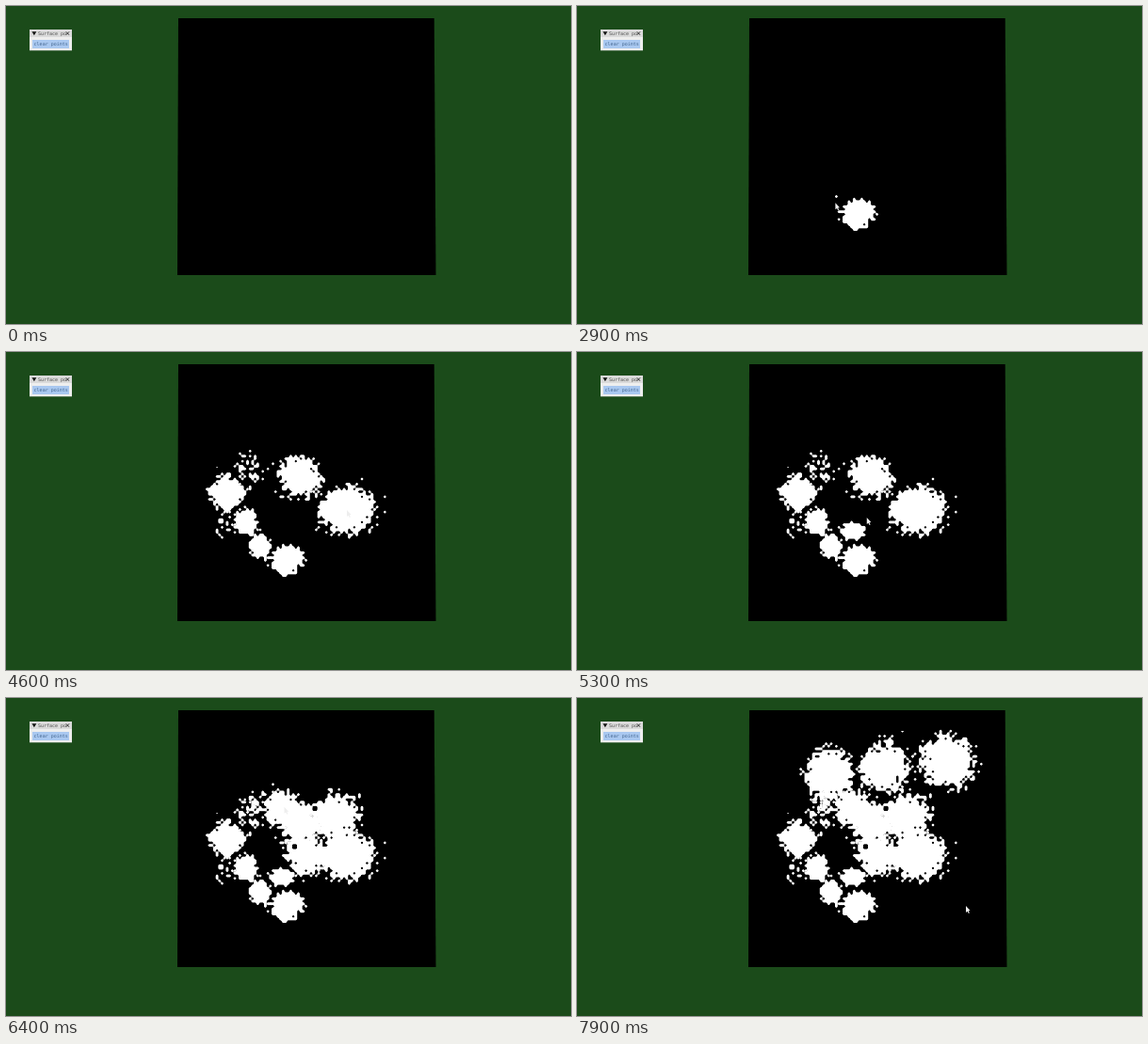
An HTML page with a canvas that plays this animation: 600x338 px, repeating every 8000 ms.

```html
<!DOCTYPE html>
<html lang="en">
<head>
<meta charset="utf-8">
<title>Surface points</title>
<style>
html, body { margin: 0; width: 100%; height: 100%; overflow: hidden; background: #1b4b1a; }
canvas { display: block; }
</style>
</head>
<body>
<canvas id="stage" width="600" height="338"></canvas>
<script>
const W = 600, H = 338, LOOP = 8000, STEP = 100;
const PITCH = 2.7, SCATTER = .1;
const ctx = document.getElementById('stage').getContext('2d');
const stops = [], sprays = [];

const mix = (a, b, k) => a + (b - a) * k;
const clamp = v => Math.max(0, Math.min(1, v));
const smooth = k => k * k * (3 - 2 * k);

function rand(i, j, seed) {
  let h = Math.imul(i, 374761393) + Math.imul(j, 668265263) + Math.imul(seed, 974634777);
  h = Math.imul(h ^ (h >>> 13), 1274126177);
  return ((h ^ (h >>> 16)) >>> 0) / 4294967296;
}

// The pointer reaches (x, y) at time t.
function move(t, x, y) {
  stops.push({ t, x, y });
}

// The pointer reaches (x, y) and scatters points there; ratio is width to height.
function spray(t, x, y, r, ratio = 1, density = 1) {
  move(t, x, y);
  const rx = r * Math.sqrt(ratio), ry = r / Math.sqrt(ratio);
  const reach = 1 + SCATTER * 5, seed = sprays.length + 1;
  const left = Math.floor(x - rx * reach), top = Math.floor(y - ry * reach);
  const w = Math.ceil(2 * rx * reach), h = Math.ceil(2 * ry * reach);

  // Cells are filled at random, less often further out.
  const cell = (i, j) => {
    const d = Math.hypot((i * PITCH - x) / rx, (j * PITCH - y) / ry);
    const chance = density / (1 + Math.exp((d - 1) / SCATTER));
    return rand(i, j, seed) < chance ? 1 : 0;
  };
  const cover = (px, py) => {
    const u = px / PITCH, v = py / PITCH, i = Math.floor(u), j = Math.floor(v);
    return mix(mix(cell(i, j), cell(i + 1, j), u - i),
               mix(cell(i, j + 1), cell(i + 1, j + 1), u - i), v - j);
  };

  const canvas = document.createElement('canvas');
  canvas.width = w;
  canvas.height = h;
  const g = canvas.getContext('2d'), img = g.createImageData(w, h);
  for (let k = 0; k < w * h; k++) {
    const v = cover(left + k % w + .5, top + Math.floor(k / w) + .5);
    img.data.fill(255, k * 4, k * 4 + 3);
    img.data[k * 4 + 3] = 255 * clamp((v - .47) * 3 + .5);
  }
  g.putImageData(img, 0, 0);
  sprays.push({ t, canvas, left, top });
}

move(2100, 309, 276);
move(2300, 268, 210);
spray(2600, 298, 221, 16);
spray(3000, 270, 207, 12.5, .75);
spray(3200, 255, 181, 13);
spray(3300, 234, 181, 14, 1, .22);
spray(3400, 235, 149, 18);
spray(3700, 258, 125, 16, .9, .42);
move(4100, 321.5, 118.5);
spray(4300, 312, 133, 21.5);
spray(4600, 362, 168, 27, 1.2);
spray(4900, 292, 190, 11, 1.4);
spray(5600, 318, 167, 21);
spray(5900, 350, 125, 23);
spray(6200, 270, 111, 15, 1, .35);
spray(6300, 293, 119, 18.5);
spray(6900, 327, 74, 26);
move(7200, 279, 56);
spray(7300, 268, 81, 26, .9);
spray(7600, 393, 67, 28);
move(7900, 413, 221);

function poly(color, ...pts) {
  ctx.fillStyle = color;
  ctx.beginPath();
  for (let i = 0; i < pts.length; i += 2) ctx.lineTo(pts[i], pts[i + 1]);
  ctx.fill();
}

function box(color, x, y, w, h) {
  ctx.fillStyle = color;
  ctx.fillRect(x, y, w, h);
}

function label(color, text, x, y) {
  ctx.fillStyle = color;
  ctx.fillText(text, x, y);
}

function panel() {
  box('#dadada', 25, 25, 45, 8);
  box('#eeeeee', 25, 33, 45, 14.3);
  box('#a9c8f0', 28, 36, 39, 9);
  poly('#111', 27.5, 27.3, 32.3, 27.3, 29.9, 31.3);
  ctx.font = '5px "DejaVu Sans Mono", monospace';
  label('#505050', 'Surface po', 34, 31);
  label('#44668f', 'clear points', 29.6, 42.2);
  ctx.strokeStyle = '#222';
  ctx.lineWidth = .9;
  ctx.beginPath();
  ctx.moveTo(63.8, 27.4);
  ctx.lineTo(67, 30.8);
  ctx.moveTo(67, 27.4);
  ctx.lineTo(63.8, 30.8);
  ctx.stroke();
}

function pointer(t) {
  const next = stops.findIndex(s => s.t > t);
  if (next === 0) return;
  const b = next < 0 ? stops[stops.length - 1] : stops[next];
  const a = next < 0 ? b : stops[next - 1];
  const k = a === b ? 1 : smooth((t - a.t) / (b.t - a.t));
  ctx.save();
  ctx.translate(mix(a.x, b.x, k), mix(a.y, b.y, k));
  poly('#eee', 0, 0, 4.6, 5, 2.8, 5.2, 3.8, 7.6, 2.8, 8, 1.7, 5.8, 0, 7);
  ctx.restore();
}

function draw(now) {
  const t = Math.floor(now % LOOP / STEP) * STEP;
  box('#1b4b1a', 0, 0, W, H);
  poly('#000', 183, 13, 454.7, 13, 456.5, 286, 182, 286);
  for (const s of sprays) if (t >= s.t) ctx.drawImage(s.canvas, s.left, s.top);
  pointer(t);
  panel();
}

const start = performance.now();
function loop() {
  draw(performance.now() - start);
  requestAnimationFrame(loop);
}
loop();
</script>
</body>
</html>
```
